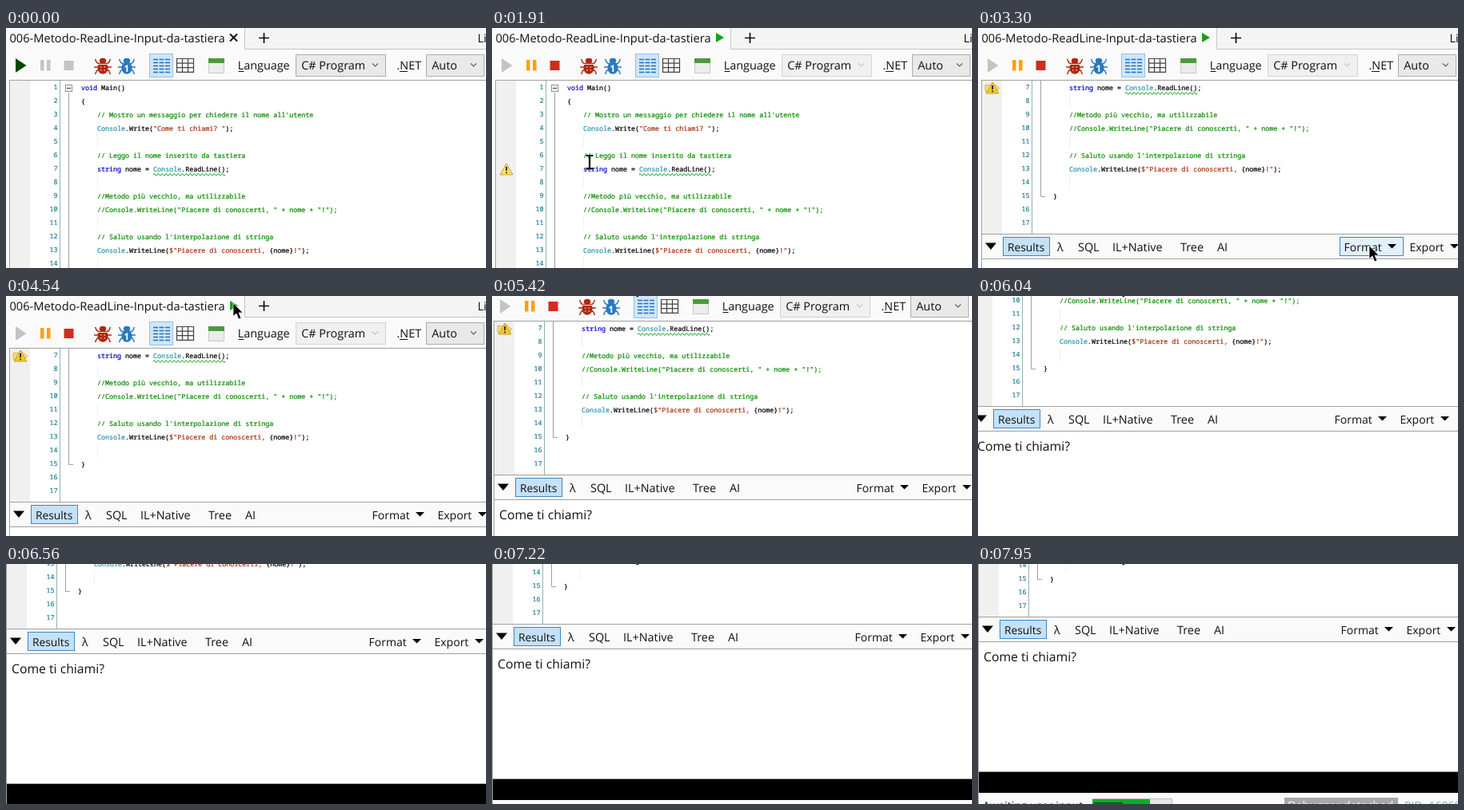
An HTML page for the animation above (8 s loop, 600 px wide and 301 px high).

```html
<!DOCTYPE html>
<html lang="it">
<head>
<meta charset="utf-8">
<title>Metodo ReadLine</title>
<style>
html, body { margin: 0; width: 100%; height: 100%; overflow: hidden; background: #fff; }
svg { display: block; }
text { white-space: pre; text-rendering: geometricPrecision; }
.ui { font: 14.4px "Open Sans", "Noto Sans", sans-serif; fill: #111; }
.code { font: 8.35px "Noto Sans Mono", "DejaVu Sans Mono", monospace; }
.code, .code tspan { fill: currentColor; stroke: currentColor; stroke-width: .22px; color: #000; }
.code .k { color: #0000d8; }
.code .t { color: #2b91af; }
.code .c { color: #0a8a00; }
.code .s { color: #a5330f; }
.code.n { color: #237f93; }
</style>
</head>
<body>
<svg id="stage" width="600" height="301" viewBox="0 0 600 301"></svg>
<script>
const LOOP = 8000, RUN = 1440, OPEN = 2050, LINE = 17, SCROLL = 102;

// Markup helpers
const rect = (x, y, w, h, fill, more = '') =>
  `<rect x="${x}" y="${y}" width="${w}" height="${h}" fill="${fill}" ${more}/>`;
const box = (x, y, w, h, fill, stroke, more) =>
  rect(x + .5, y + .5, w - 1, h - 1, fill, `stroke="${stroke}" ${more || ''}`);
const path = (d, fill, stroke = 'none', width = 1, more = '') =>
  `<path d="${d}" fill="${fill}" stroke="${stroke}" stroke-width="${width}" ${more}/>`;
const label = (x, y, s, style = '') => `<text class="ui" x="${x}" y="${y}" style="${style}">${s}</text>`;
const group = (id, s) => `<g id="${id}">${s}</g>`;
const down = (x, y, w, h) => path(`M${x} ${y}h${w}l${-w / 2} ${h}z`, '#000');

const lines = [
  [0, 'k', 'void', '', ' Main()'],
  [0, '', '{'],
  [4, 'c', "// Mostro un messaggio per chiedere il nome all'utente"],
  [4, 't', 'Console', '', '.Write(', 's', '"Come ti chiami? "', '', ');'],
  [],
  [4, 'c', '// Leggo il nome inserito da tastiera'],
  [4, 'k', 'string', '', ' nome = ', 't', 'Console', '', '.ReadLine();'],
  [],
  [4, 'c', '//Metodo più vecchio, ma utilizzabile'],
  [4, 'c', '//Console.WriteLine("Piacere di conoscerti, " + nome + "!");'],
  [],
  [4, 'c', "// Saluto usando l'interpolazione di stringa"],
  [4, 't', 'Console', '', '.WriteLine(', 's', '$"Piacere di conoscerti, ', '', '{nome}', 's', '!"', '', ');'],
  [],
  [0, '', '}'],
  [], []
];

function codeLine([indent, ...parts], i) {
  const y = 78 + i * LINE;
  let spans = '';
  for (let j = 0; j < parts.length; j += 2)
    spans += `<tspan class="${parts[j]}">${parts[j + 1]}</tspan>`;
  const guide = !spans && i < 14 ? rect(114, y - 12, 1, LINE, '#f0f0f0') : '';
  return guide +
    `<text class="code n" x="64.5" y="${y - 1}" text-anchor="end">${i + 1}</text>` +
    `<text class="code" x="${94 + (indent || 0) * 5}" y="${y}">${spans}</text>`;
}

function editor() {
  const wave = 'M184 184' + 'q1.25 -3 2.5 0t2.5 0'.repeat(18);
  return rect(4, 60, 640, 500, '#fff') + rect(5, 60, 25, 500, '#f0f0f0') +
    rect(67, 60, 1, 500, '#8fb3b8') +
    path('M78.5 81V313.5H84', 'none', '#a0a0a0') +
    box(74, 71, 9, 9, '#fff', '#8c8c8c') + rect(76, 75, 5, 1, '#333') +
    lines.map(codeLine).join('') +
    path(wave, 'none', '#18a018') +
    group('warn',
      group('arrow', path('M9 173.5h9v-3l9 7l-9 7v-3h-9z', '#f8dc70', '#d0a838', .7)) +
      path('M18 170L26 184H10z', '#ffe25a', '#c9a437', 1, 'stroke-linejoin="round" id="sign"') +
      rect(17.2, 174, 1.8, 5, '#222') + rect(17.2, 180.5, 1.8, 1.8, '#222'));
}

function bug(x, color, mark) {
  return path(`M${x - 9.5} 39l2 4.5l4 2m7 0l4 -2l2 -4.5M${x - 11} 49h22M${x - 9.5} 58l2 -4.5l4 -2m7 0l4 2l2 4.5`,
    'none', color, 1.5) +
    `<ellipse cx="${x}" cy="50" rx="6.6" ry="7.8" fill="${color}"/>` +
    `<ellipse cx="${x}" cy="41" rx="4.2" ry="3.2" fill="${color}"/>` + mark;
}

function combo(id, x, w, s) {
  return box(x, 33, w, 28, '#e9e9e9', '#adadad', `id="${id}"`) + label(x + 7.2, 52, s) +
    path(`M${x + w - 17} 44.5l3.5 3.5l3.5 -3.5`, 'none', '#606060', 1.1, `id="${id}Mark"`);
}

function table(x, color, cols) {
  let d = '';
  for (let i = 0; i < 4; i++) d += `M${x} ${38.5 + i * 5.6}h22`;
  for (let i = 0; i <= cols; i++) d += `M${x + .5 + i * 21 / cols} 38v18`;
  return path(d, 'none', color, 1.2);
}

function listIcon() {
  let d = '';
  for (let i = 0; i < 5; i++) d += `M184 ${39.5 + i * 4}h6m1.5 0h6m1.5 0h6`;
  return path(d, 'none', '#1f6fc0', 1.6);
}

function toolbar() {
  return rect(0, 0, 640, 66, '#fafafa') + rect(299, 0, 341, 26, '#f4f4f4') +
    path('M298.5 0V26.5H640', 'none', '#c4c4c4') +
    label(4.5, 17.5, '006-Metodo-ReadLine-Input-da-tastiera', 'font-size:14.63px') +
    path('M280 7.5l9 9m0 -9l-9 9', 'none', '#111', 2, 'id="close"') +
    path('M280 6l10 6l-10 6z', '#16a016', 'none', 1, 'id="busy"') +
    path('M316 12.5h13M322.5 6v13', 'none', '#111', 1.7) + label(589.5, 17.5, 'Li') +
    box(4, 31, 30, 31, '#e5f1fb', '#a9d1f2', 'id="hot"') +
    path('M12 38l13.5 9l-13.5 9z', '#004a00', 'none', 1, 'id="play"') +
    path('M43 40h4.5v13.5H43zM51 40h4.5v13.5H51z', '#c4c4c4', 'none', 1, 'id="pause"') +
    rect(72.5, 41, 12, 12, '#c4c4c4', 'id="stop"') +
    bug(121, '#b02810', path('M115 45.5h12', 'none', '#f8e0d8', 1) +
      path('M118 49h1.5M122.5 49h1.5M118 53h1.5M122.5 53h1.5', 'none', '#f0b8a8', 1.6)) +
    bug(151, '#2a78c0', label(147.3, 54.5, '1', 'fill:#fff;font-size:12px;font-weight:700')) +
    box(179, 32, 30, 30, '#cfe6f9', '#8fc3ec') + listIcon() +
    table(213, '#444', 3) +
    box(253, 38, 20, 19, '#ececec', '#c8c8c8') + rect(253, 38, 20, 6, '#4c9a3c') +
    label(289.7, 52, 'Language') + rect(290.5, 54, 7, 1, '#111') +
    combo('lang', 362, 113, 'C# Program') +
    label(488.5, 52, '.NET') + rect(492, 54, 10, 1, '#111') +
    combo('auto', 525, 73, 'Auto') +
    rect(4, 65, 636, 1, '#a0a0a0') + rect(4, 65, 1, 500, '#a0a0a0');
}

function results() {
  const tabs = [[99, 'λ'], [125, 'SQL'], [168, 'IL+Native'], [253, 'Tree'], [299, 'AI']];
  return rect(0, 258, 640, 300, '#fafafa') + rect(4, 258, 636, 1, '#a0a0a0') +
    down(9, 269.5, 14, 8.5) +
    box(31, 262, 59, 24, '#c4e1f7', '#3f87c0') + label(37, 279.5, 'Results', 'font-size:13.8px') +
    tabs.map(([x, s]) => label(x, 279.5, s)).join('') +
    box(452, 262, 80, 24, '#e2f0fb', '#3f87c0', 'id="hotFormat"') +
    label(457.5, 279.5, 'Format', 'font-size:14px') + down(512, 271, 11, 5.5) +
    label(539.5, 279.5, 'Export', 'font-size:14px') + down(590, 271, 11, 5.5) +
    box(4, 289, 640, 164, '#fff', '#a0a0a0') +
    label(11, 314, 'Come ti chiami?', 'font-size:15.75px') +
    rect(0, 453, 640, 26, '#000') +
    label(10, 500, 'Awaiting user input', 'font-size:13.9px') +
    box(147, 486, 100, 20, '#e6e6e6', '#bcbcbc') +
    rect(147, 487, 54, 18, '#06b025', 'id="bar"') + rect(149, 491, 36, 1.5, '#064d10') +
    rect(387, 485, 142, 22, '#a8a8a8') + label(391, 500, 'Debugger detached', 'fill:#fff') +
    label(537, 500, 'PID=16068', 'fill:#7fb3bb;font-size:14px');
}

const stage = document.getElementById('stage');
stage.innerHTML = rect(0, 0, 600, 301, '#fff') +
  group('world',
    rect(0, 0, 640, 600, '#fafafa') +
    group('text', editor()) + group('panel', results()) + toolbar()) +
  group('pointer', path('M0 0V16.5L4 13L6.8 20L9.8 18.8L7 12H12Z', '#000', '#fff', .7)) +
  group('beam', path('M-4.5 -8h3.5l1 1l1 -1h3.5M-4.5 8.5h3.5l1 -1l1 1h3.5M0 -7V8', 'none', '#000', 2.2));

const el = {};
stage.querySelectorAll('[id]').forEach(e => el[e.id] = e);

const set = (e, name, value) => e.setAttribute(name, value);
const show = (e, on) => set(e, 'visibility', on ? 'visible' : 'hidden');
const move = (e, x, y) => set(e, 'transform', `translate(${x} ${y})`);

// Bursts of motion: start, end, number of steps
const bursts = [
  [200, 960, 12], [1030, 1100, 2], [1300, 1300, 1], [1440, 2180, 11], [2250, 2880, 10],
  [3160, 3930, 12], [4000, 4770, 12], [4880, 4880, 1], [5040, 5040, 1],
  [5280, 6040, 12], [6110, 6560, 8], [6890, 7690, 12], [7750, 7950, 3]
];

function snap(t) {
  let out = 0;
  for (const [a, b, n] of bursts) {
    if (t < a) break;
    const d = n > 1 ? (b - a) / (n - 1) : 1;
    out = Math.min(b, a + Math.floor((t - a) / d + 1e-6) * d);
  }
  return out;
}

// Keys: time, x, y
const mouse = [
  [200, 540, 278], [480, 360, 190], [720, 120, 90], [960, 27, 46], [1030, 27, 50], [1100, 27, 56],
  [1440, 28, 58], [1660, 80, 110], [1880, 122, 168], [1960, 122, 168], [2180, 150, 120],
  [2390, 210, 20], [2600, 290, 110], [2880, 387, 236], [3160, 440, 258], [3300, 489, 273],
  [3440, 478, 284], [3580, 300, 282], [3720, 110, 180], [3860, 68, 50], [3930, 130, 4],
  [4000, 220, 6], [4280, 385, 4], [4560, 250, 10], [4770, 171, -18], [4880, 172, -18], [5040, 174, -18]
];
const camera = [
  [5210, 0, 0], [5420, -2, -34], [6040, -12, -120], [6560, -4, -177], [6830, -4, -177], [7690, -4, -192]
];

function at(keys, t) {
  const i = keys.findIndex(k => k[0] > t);
  if (i < 0) return keys[keys.length - 1].slice(1);
  if (!i) return keys[0].slice(1);
  const [t0, x0, y0] = keys[i - 1], [t1, x1, y1] = keys[i];
  const p = (t - t0) / (t1 - t0);
  return [x0 + (x1 - x0) * p, y0 + (y1 - y0) * p].map(Math.round);
}

const inside = (x, y, l, t, r, b) => x >= l && x < r && y >= t && y < b;

function draw(now) {
  const t = snap(now), running = t >= RUN, open = t >= OPEN;
  const [x, y] = at(mouse, t);
  move(el.world, ...at(camera, t));
  move(el.text, 0, open ? -SCROLL : 0);
  show(el.panel, open);
  show(el.warn, running);
  show(el.arrow, t >= 2250);
  set(el.sign, 'fill', t >= 2250 ? '#f2c62c' : '#ffe25a');
  show(el.close, !running);
  show(el.busy, running);
  set(el.play, 'fill', running ? '#c4c4c4' : '#004a00');
  set(el.pause, 'fill', running ? '#ffa010' : '#c4c4c4');
  set(el.stop, 'fill', running ? '#d42a20' : '#c4c4c4');
  set(el.lang, 'fill', running ? '#f0f0f0' : '#e9e9e9');
  set(el.lang, 'stroke', running ? '#d4d4d4' : '#adadad');
  set(el.langMark, 'stroke', running ? '#c4c4c4' : '#606060');

  show(el.hot, !running && t >= 200 && inside(x, y, 4, 31, 34, 62));
  set(el.hot, 'fill', t >= 1300 ? '#c4e1f7' : '#e5f1fb');
  show(el.hotFormat, open && inside(x, y, 452, 262, 532, 286));
  set(el.bar, 'width', 54 + Math.max(0, t - 7690) * 18 / 260);

  const typing = inside(x, y, 68, 66, 600, open ? 258 : 301);
  show(el.pointer, t >= 200 && !typing);
  show(el.beam, t >= 200 && typing);
  move(el.pointer, x, y);
  move(el.beam, x, y);
}

function tick() {
  draw(performance.now() % LOOP);
  requestAnimationFrame(tick);
}
tick();
</script>
</body>
</html>
```
